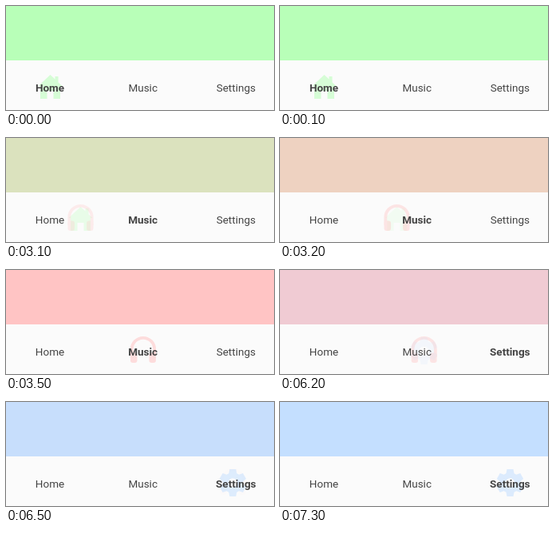
Recreate the animation shown at these times as an HTML page. Size 336x130 px, loop 8 s.

```html
<!DOCTYPE html>
<html lang="en">
<head>
<meta charset="utf-8">
<title>Tab bar</title>
<style>
  html, body { margin: 0; width: 100%; height: 100%; overflow: hidden; background: #fbfbfb; }
  svg { display: block; width: 336px; height: 130px; }
  text { font: 400 13.5px Roboto, sans-serif; fill: #444; text-anchor: middle; }
  text.on { font-weight: 700; }
</style>
</head>
<body>
<svg viewBox="0 0 336 130">
  <defs>
    <path id="tooth" d="M-5.6 -9L-4 -17H4L5.6 -9Z"/>
  </defs>
  <rect id="panel" width="336" height="68"/>
  <g id="slider">
    <g class="icon" fill="#b8ffb8">
      <path d="M0 -15L6 -9.4V-13H10V-5.6L15 -1H12.5V15H4V5H-4V15H-12.5V-1H-15Z"/>
    </g>
    <g class="icon" fill="#ffc4c4">
      <path d="M-14.2 8V-2A14.2 14.2 0 0 1 14.2 -2V8" fill="none" stroke="#ffc4c4" stroke-width="3.8"/>
      <rect x="-16" y="2.5" width="8.5" height="12.5" rx="3"/>
      <rect x="7.5" y="2.5" width="8.5" height="12.5" rx="3"/>
    </g>
    <g class="icon" fill="#c4dfff">
      <circle r="9.2" fill="none" stroke="#c4dfff" stroke-width="7"/>
      <use href="#tooth"/>
      <use href="#tooth" transform="rotate(60)"/>
      <use href="#tooth" transform="rotate(120)"/>
      <use href="#tooth" transform="rotate(180)"/>
      <use href="#tooth" transform="rotate(240)"/>
      <use href="#tooth" transform="rotate(300)"/>
    </g>
  </g>
  <text x="55" y="106.5">Home</text>
  <text x="171.7" y="106.5">Music</text>
  <text x="288.3" y="106.5">Settings</text>
</svg>
<script>
const LOOP = 8000, TICK = 100, ICON_ALPHA = 0.55;
const tabs = [
  { x: 55.5, color: [184, 255, 184] },
  { x: 172, color: [255, 196, 196] },
  { x: 288.5, color: [196, 223, 255] }
];
const moves = [
  { start: 2930, length: 590 },
  { start: 6100, length: 550 }
];
const panel = document.getElementById('panel');
const slider = document.getElementById('slider');
const icons = document.querySelectorAll('.icon');
const labels = document.querySelectorAll('text');

const mix = (a, b, k) => a + (b - a) * k;

function bezier(x1, y1, x2, y2) {
  const at = (a, b, s) => 3 * a * s * (1 - s) ** 2 + 3 * b * s * s * (1 - s) + s ** 3;
  return t => {
    if (t <= 0) return 0;
    if (t >= 1) return 1;
    let lo = 0, hi = 1;
    for (let i = 0; i < 24; i++) {
      const mid = (lo + hi) / 2;
      if (at(x1, x2, mid) < t) lo = mid; else hi = mid;
    }
    return at(y1, y2, lo);
  };
}
const fade = bezier(0.25, 0.1, 0.25, 1);
const glide = bezier(0.5, 0, 0.05, 1);

function draw(ms) {
  const active = moves.filter(m => ms >= m.start).length;
  const prev = Math.max(active - 1, 0);
  const move = moves[prev];
  const t = active ? Math.min((ms - move.start) / move.length, 1) : 0;
  const from = tabs[prev], to = tabs[active], k = fade(t);

  const rgb = from.color.map((c, i) => Math.round(mix(c, to.color[i], k)));
  panel.setAttribute('fill', `rgb(${rgb})`);
  slider.setAttribute('transform', `translate(${mix(from.x, to.x, glide(t))} 101)`);
  icons.forEach((icon, i) => {
    const share = active === 0 ? +(i === 0) : i === active ? k : i === prev ? 1 - k : 0;
    icon.setAttribute('opacity', share * ICON_ALPHA);
  });
  labels.forEach((label, i) => label.classList.toggle('on', i === active));
}

// The motion is shown at ten steps a second.
const begin = performance.now();
function loop() {
  const ms = (performance.now() - begin) % LOOP;
  draw(Math.floor(ms / TICK) * TICK);
  requestAnimationFrame(loop);
}
loop();
</script>
</body>
</html>
```
